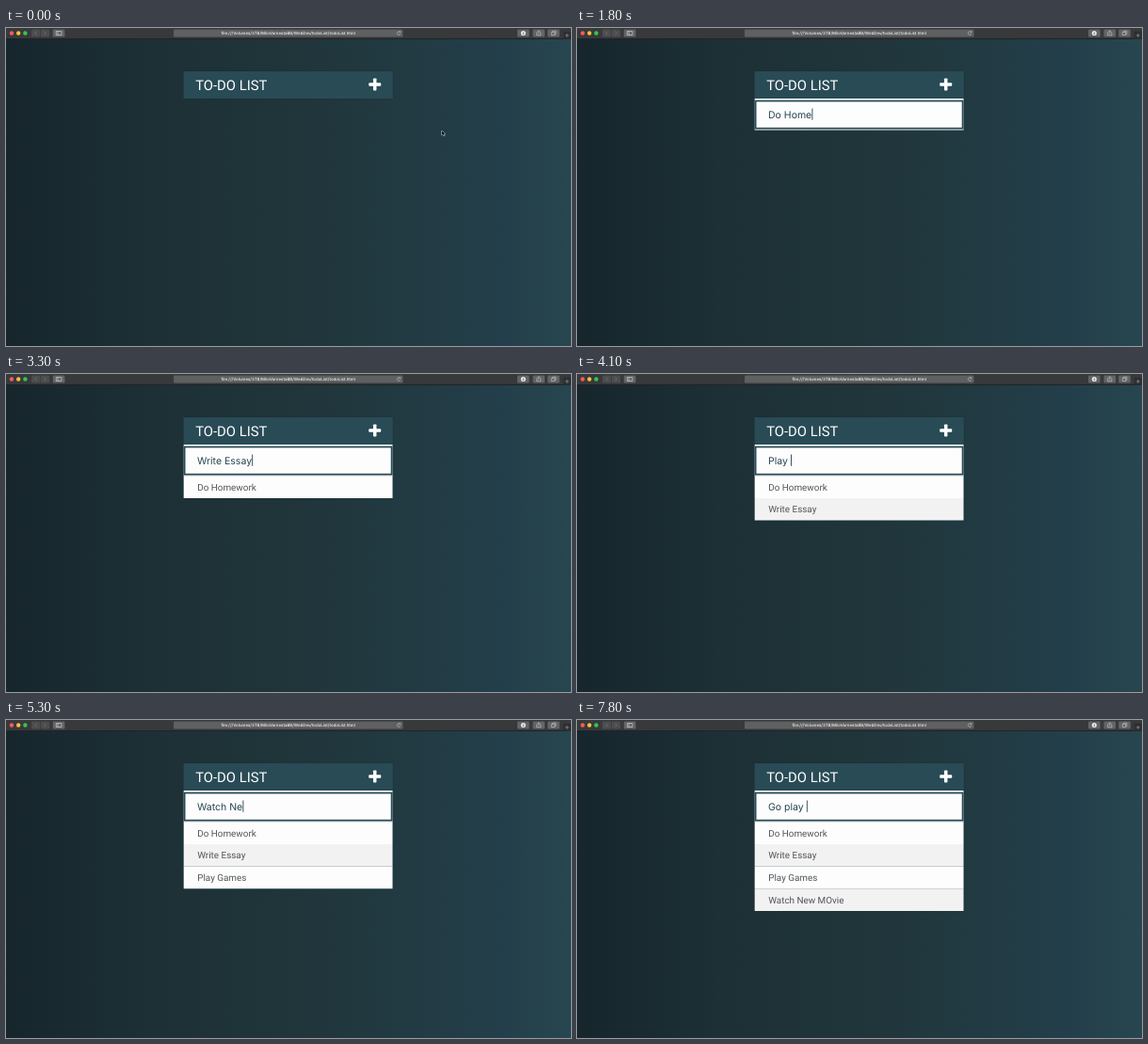
Animation of 600 by 338 pixels, one loop 8000 ms. Source, as an HTML page with a canvas:

```html
<!DOCTYPE html>
<html lang="en">
<head>
<meta charset="utf-8">
<title>To-Do List</title>
<style>
html, body { margin: 0; width: 100%; height: 100%; overflow: hidden; background: #20363d; }
canvas { display: block; }
</style>
</head>
<body>
<canvas id="stage" width="600" height="338"></canvas>
<script>
const c = document.getElementById('stage').getContext('2d');
c.textRendering = 'geometricPrecision';
const LOOP = 8000, LEFT = 188.7, WIDTH = 221.8, ROW = 23.7, LIST_TOP = 108.2;
const OPEN = 610, FOCUS = 900, TYPE = 1400;
const TEAL = '#294b56', INK = '#23434e';

// start: first key, step: time per key, add: Enter
const todos = [
  { text: 'Do Homework', start: 1400, step: 60, add: 2100 },
  { text: 'Write Essay', start: 2525, step: 75, add: 3400 },
  { text: 'Play Games', start: 3760, step: 84, add: 4700 },
  { text: 'Watch New MOvie', start: 4740, step: 78, add: 6000 }
];

const backdrop = c.createLinearGradient(0, 0, 600, 0);
[[0, '#16262c'], [.25, '#1c3035'], [.5, '#20353a'], [.75, '#223b44'], [.88, '#233f4b'], [1, '#27464f']]
  .forEach(([at, color]) => backdrop.addColorStop(at, color));

function rect(x, y, w, h, color, r = 0) {
  c.fillStyle = color;
  c.beginPath();
  c.roundRect(x, y, w, h, r);
  c.fill();
}

function text(s, x, y, font, color, align = 'left') {
  c.font = font;
  c.fillStyle = color;
  c.textAlign = align;
  c.fillText(s, x, y);
}

function path(d, color, width = .7) {
  c.strokeStyle = color;
  c.lineWidth = width;
  c.stroke(new Path2D(d));
}

function dot(x, y, r, color) {
  rect(x - r, y - r, 2 * r, 2 * r, color, r);
}

const clamp = v => Math.max(0, Math.min(1, v));
const ease = v => (v = clamp(v), v * v * (3 - 2 * v));
const mix = (a, b, v) => a + (b - a) * v;
const typed = (s, start, step, t) => s.slice(0, Math.max(0, Math.floor((t - start) / step) + 1));

function toolbar() {
  rect(0, 0, 600, 12, '#1a1c1e');
  rect(0, 0, 600, 11.2, '#37393b');
  ['#fc5b57', '#fdbc40', '#34c84a'].forEach((color, i) => dot(6 + i * 7.2, 5.5, 2.2, color));
  rect(27, 1.6, 9.2, 7.8, '#4b4d4f', 1.2);
  rect(36.8, 1.6, 9.2, 7.8, '#4b4d4f', 1.2);
  path('M32.4 3.7l-1.7 1.8l1.7 1.8M40.6 3.7l1.7 1.8l-1.7 1.8', '#77797b');
  [49.8, 543, 559.5, 575.2].forEach(x => rect(x, 1.6, 12.6, 7.8, '#626466', 1.2));
  path('M53.3 3.5h5.6v4h-5.6zM55.1 3.5v4', '#dedfe0', .6);
  dot(549.3, 5.5, 2.5, '#f2f2f2');
  path('M549.3 4v2.7M548.2 5.7l1.1 1.1l1.1-1.1', '#55575a', .6);
  path('M564.4 4.7h-.7v3.1h4.2v-3.1h-.7M565.8 6.3v-3.5M564.6 3.8l1.2-1.2l1.2 1.2', '#dedfe0', .5);
  path('M579.3 4.4h3.4v3.2h-3.4zM580.6 4.2v-1.1h3.3v3.2h-1', '#dedfe0', .5);
  rect(591.8, 3.8, 8.2, 8, '#2c2e30');
  path('M593.8 7.9h4M595.8 5.9v4', '#a4a6a8', .6);
  rect(178, 1.5, 243.5, 8, '#5e6062', 1.3);
  text('file:///Volumes/3TB/MiloVarnestaBB/WebDev/todoList/todoList.html',
    299.7, 7.1, '500 4.4px Inter, sans-serif', '#f4f4f4', 'center');
  path('M418.7 4.5a1.8 1.8 0 1 0 .2 1.6M418.9 3.2v1.4h-1.4', '#d8d9da', .5);
}

function header() {
  rect(LEFT, 46.3, WIDTH, 28.7, TEAL);
  text('TO-DO LIST', 201.2, 66.1, '14.8px Roboto, sans-serif', '#fff');
  rect(385.2, 58.2, 13, 3.5, '#fff', .9);
  rect(389.95, 53.4, 3.5, 13, '#fff', .9);
}

function input(t) {
  const focused = t >= FOCUS;
  c.globalAlpha = clamp((t - OPEN) / 70);
  rect(LEFT, 75, WIDTH, 33.4, focused ? '#fdfdfe' : '#f4f4f4');
  if (focused) {
    c.strokeStyle = TEAL;
    c.lineWidth = 1.8;
    c.strokeRect(LEFT + .9, 77.5, WIDTH - 1.8, 29.2);
  }
  const todo = todos.find(item => t < item.add);
  const value = todo ? typed(todo.text, todo.start, todo.step, t)
    : typed('Go ', 6900, 150, t) + typed('play ', 7400, 100, t);
  text(value || 'Add New Todo', 203, 95.7, '10.5px Inter, sans-serif',
    value ? INK : focused ? '#a3a5a6' : '#9b9b9b');
  if (focused) {
    const since = todos.reduce((last, item) => t >= item.add ? item.add : last, FOCUS);
    if (value || (t - since) % 250 < 180) {
      const x = 203.2 + (value ? c.measureText(value).width : 0);
      rect(x, 85.6, .9, 12.2, INK);
    }
  }
  c.globalAlpha = 1;
}

function list(t) {
  todos.filter(item => t >= item.add).forEach((item, i) => {
    const y = LIST_TOP + i * ROW;
    rect(LEFT, y, WIDTH, ROW, i % 2 ? '#f2f2f3' : '#fdfdfe');
    text(item.text, 203.2, y + 15.3, '9.9px Roboto, sans-serif', '#525557');
  });
}

function pointer(t) {
  if (t >= TYPE) return;
  let x, y;
  if (t < 600) {
    const k = ease((t - 50) / 450);
    x = mix(463, 392, k);
    y = mix(109.3, 60, k);
  } else if (t < 700) {
    const k = ease((t - 600) / 100);
    x = mix(392, 320.5, k);
    y = mix(60, 85.5, k);
  } else {
    const k = ease((t - 700) / 500);
    x = mix(320.5, 306, k);
    y = mix(85.5, 92, k);
  }
  c.save();
  c.translate(x, y);
  if (t > 660) {
    path('M-1.2 -2.8Q0 -2.8 0 -2V2Q0 2.8 -1.2 2.8M1.2 -2.8Q0 -2.8 0 -2M0 2Q0 2.8 1.2 2.8', '#444', .7);
  } else {
    const arrow = 'M0 0V4.7L1.1 3.7L1.9 5.5L2.7 5.1L1.9 3.4H3.4Z';
    path(arrow, '#e8ecee', .9);
    c.fillStyle = '#111';
    c.fill(new Path2D(arrow));
  }
  c.restore();
}

function draw(now) {
  const t = now % LOOP;
  rect(0, 0, 600, 338, backdrop);
  toolbar();
  c.save();
  c.shadowColor = 'rgba(0,0,0,.15)';
  c.shadowBlur = 3;
  const rows = todos.filter(item => t >= item.add).length;
  rect(LEFT, 46.3, WIDTH, t < OPEN ? 28.7 : 61.9 + rows * ROW, TEAL);
  c.restore();
  if (t >= OPEN) input(t);
  list(t);
  header();
  pointer(t);
}

const began = performance.now();
function tick() {
  draw(performance.now() - began);
  requestAnimationFrame(tick);
}
tick();
</script>
</body>
</html>
```
